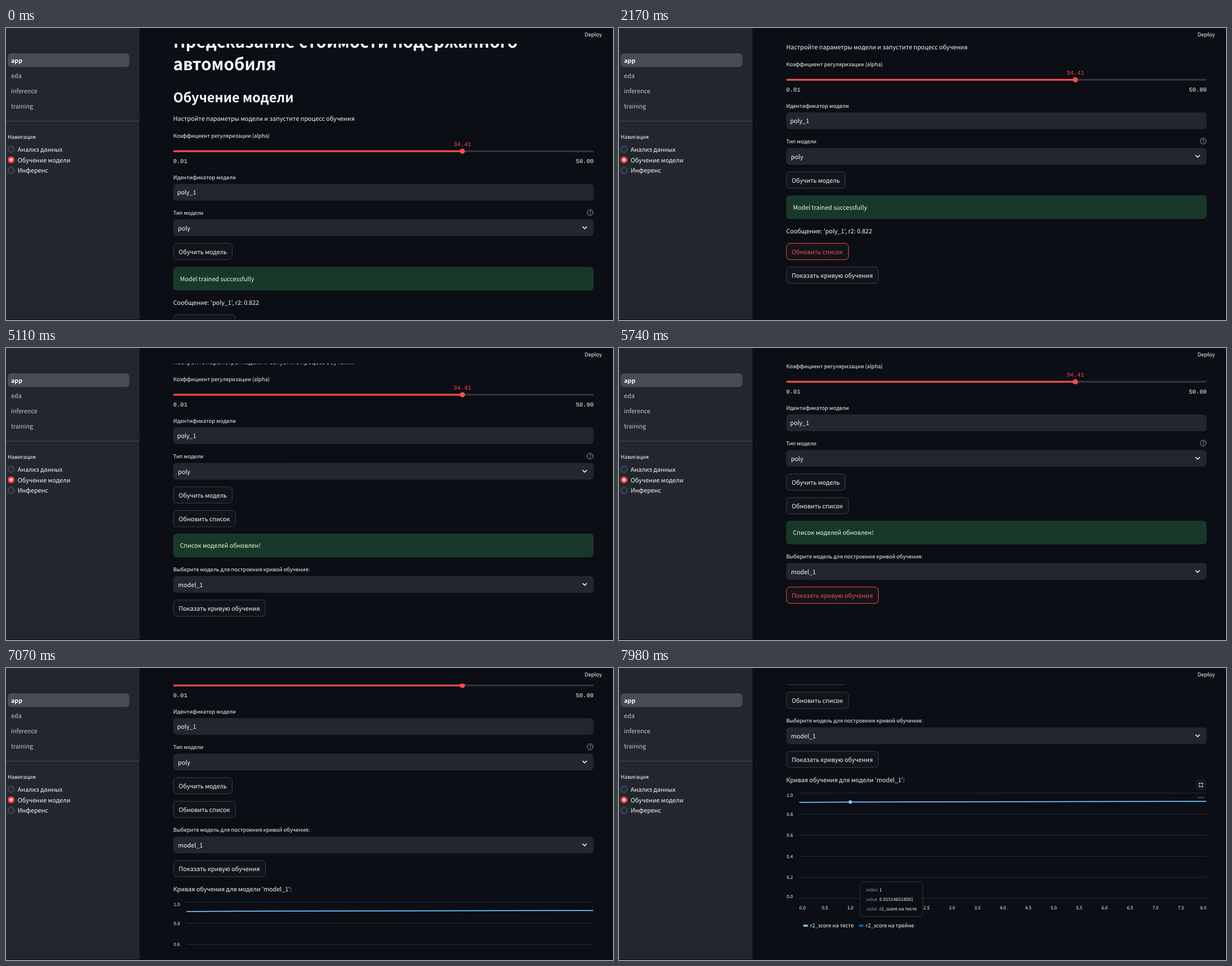
Recreate the animation shown at these times as an HTML page. Size 1080 by 519 pixels, loop 8000 ms.

```html
<!DOCTYPE html>
<html lang="ru">
<head>
<meta charset="utf-8">
<title>Обучение модели</title>
<style>
  html, body { margin: 0; width: 100%; height: 100%; overflow: hidden; background: #0b0e14; }
  svg { display: block; width: 100%; height: 100%; text-rendering: geometricPrecision; }
  text { font-family: var(--sans); font-size: calc(12px * var(--k)); fill: #fafafa; white-space: pre; }
  .label { font-size: calc(10.5px * var(--k)); }
  .tick { font-size: calc(9px * var(--k)); }
  .h1 { font-size: var(--h1); font-weight: 700; }
  .h2 { font-size: var(--h2); font-weight: 600; }
  .mono { font: 10.5px "Liberation Mono", monospace; }
  .bold { font-weight: 600; }
  .dim { fill: #c6c7cb; }
  .faint { fill: #94969c; }
  .red { fill: #ff4b4b; }
  .mid { text-anchor: middle; }
  .end { text-anchor: end; }
  .field { fill: #24262f; }
  .success { fill: #1a3829; }
  .success + text { fill: #dffde9; }
  .line { fill: none; stroke: #fafafa; stroke-linecap: round; stroke-linejoin: round; }
  .grid { stroke: #2b2e36; stroke-width: 1; }
  .button rect { fill: #11151b; stroke: #3d4047; }
  .warm rect { stroke: #9c454a; }
  .warm text { fill: #fda2a2; }
  .hot rect { stroke: #ff4b4b; }
  .hot text { fill: #ff4b4b; }
  .pressed rect { fill: #ff4b4b; stroke: #ff4b4b; }
</style>
</head>
<body>
<svg id="stage" viewBox="0 0 1080 519"></svg>
<script>
const LOOP = 8000;
const LEFT = 297.5, RIGHT = 1045.5;
const INTRO = 'Настройте параметры модели и запустите процесс обучения';
const TITLE = 'Предсказание стоимости подержанного';
const HEADING = 'Обучение модели';

// Pick a typeface with proportional Cyrillic and calibrate its optical size.
const pen = document.createElement('canvas').getContext('2d');
function widthPerPx(sample, family, weight = 400) {
  pen.font = `${weight} 100px ${family}`;
  return pen.measureText(sample).width / 100;
}
const fallback = '"Open Sans", sans-serif';
const preferred = `"Noto Sans CJK JP", "Noto Sans CJK SC", ${fallback}`;
const sans = widthPerPx('ллл', preferred) < 2.3 ? preferred : fallback;
const root = document.documentElement.style;
root.setProperty('--sans', sans);
root.setProperty('--k', 323 / 12 / widthPerPx(INTRO, sans));
root.setProperty('--h1', 613 / widthPerPx(TITLE, sans, 700) + 'px');
root.setProperty('--h2', 214.5 / widthPerPx(HEADING, sans, 600) + 'px');

const text = (x, y, str, cls = '') => `<text x="${x}" y="${y}" class="${cls}">${str}</text>`;
const rect = (x, y, w, h, r, attrs) =>
  `<rect x="${x}" y="${y}" width="${w}" height="${h}" rx="${r}" ${attrs}/>`;
const circle = (x, y, r, attrs) => `<circle cx="${x}" cy="${y}" r="${r}" ${attrs}/>`;
const path = (d, attrs) => `<path d="${d}" ${attrs}/>`;
const group = (id, body, cls = '') => `<g id="${id}" class="${cls}">${body}</g>`;

const field = y => rect(LEFT, y, RIGHT - LEFT, 29.7, 6, 'class="field"');
const select = (y, value) => field(y) + text(306, y + 19.4, value) +
  path(`M1026.2 ${y + 13.2}l3.4 3.4 3.4-3.4`, 'class="line" stroke-width="1.5"');
const button = (id, width, label) => group(id,
  rect(LEFT + .5, .5, width - 1, 29, 6, '') + text(307.3, 19.3, label), 'button');
const success = (id, message) => group(id,
  rect(LEFT, 0, RIGHT - LEFT, 42, 6, 'class="success"') + text(309.5, 25.3, message));

function sidebar() {
  const pages = ['app', 'eda', 'inference', 'training'];
  const modes = ['Анализ данных', HEADING, 'Инференс'];
  return rect(0, 0, 237.5, 519, 0, 'fill="#24262f"') +
    rect(3, 45, 216.5, 24.3, 6, 'fill="#484a54"') +
    pages.map((p, i) => text(9, 61.7 + 27.1 * i, p, i ? 'dim' : 'bold')).join('') +
    rect(0, 165, 237.5, 1, 0, 'fill="#4d4f57"') +
    text(3, 197.2, 'Навигация', 'label') +
    modes.map((m, i) => {
      const y = 215.5 + 18.8 * i;
      const dot = i === 1
        ? circle(9, y, 6, 'class="red"') + circle(9, y, 2.2, 'fill="#fff"')
        : circle(9, y, 5.5, 'fill="#282a33" stroke="#6b6d74"');
      return dot + text(20.7, y + 4.3, m);
    }).join('');
}

function form() {
  return text(LEFT, 35.3, TITLE, 'h1') + text(LEFT, 74.8, 'автомобиля', 'h1') +
    text(LEFT, 132.3, HEADING, 'h2') +
    text(LEFT, 164.8, INTRO) +
    text(LEFT, 194.8, 'Коэффициент регуляризации (alpha)', 'label') +
    text(812, 209.6, '34.41', 'mono red mid') +
    rect(LEFT, 217.5, RIGHT - LEFT, 3, 1.5, 'fill="#34373e"') +
    rect(LEFT, 217.5, 514.5, 3, 1.5, 'class="red"') +
    circle(812, 219, 4.6, 'class="red"') +
    text(LEFT, 239.6, '0.01', 'mono') + text(RIGHT, 239.6, '50.00', 'mono end') +
    text(LEFT, 268.8, 'Идентификатор модели', 'label') +
    field(277) + text(304.5, 296.3, 'poly_1') +
    text(LEFT, 331.8, 'Тип модели', 'label') +
    circle(1039.3, 328, 5.2, 'fill="none" stroke="#a3a5aa"') +
    text(1039.3, 331.2, '?', 'tick mid dim') +
    select(340.2, 'poly');
}

// Chart coordinates have the top grid line at y = 0.
function chart() {
  const x0 = 321, x1 = 1045, unit = (x1 - x0) / 8, height = 187.2;
  const px = v => x0 + v * unit, py = v => (1 - v) * height;
  let out = text(LEFT, -19, "Кривая обучения для модели 'model_1':");
  for (let i = 0; i <= 5; i++) {
    const y = height * i / 5;
    const nudge = i === 0 ? 3.5 : i === 5 ? -4 : 0;
    out += path(`M${x0} ${y}H${x1}`, 'class="grid"') +
      text(309.5, y + 3.2 + nudge, (1 - i / 5).toFixed(1), 'tick end');
  }
  for (let i = 0; i <= 16; i++) {
    const nudge = i === 0 ? 5.3 : i === 16 ? -5.3 : 0;
    out += text(px(i / 2) + nudge, 206.3, (i / 2).toFixed(1), 'tick mid');
  }
  const curve = [[0, .9125], [1, .91515], [3, .918], [8, .9215]];
  const plot = (shift, color) => path('M' + curve.map(([x, v]) => `${px(x)} ${py(v) + shift}`).join('L'),
    `fill="none" stroke="${color}" stroke-width="1.5"`);
  out += plot(.3, '#0068c9') + plot(0, '#83c9ff');
  [['#83c9ff', 'r2_score на тесте', 328], ['#0068c9', 'r2_score на трейне', 427]].forEach(([color, name, x]) => {
    out += rect(x, 234, 8, 3.4, .5, `fill="${color}"`) + text(x + 12, 239, name, 'label');
  });
  const dots = [1031.3, 1035.5, 1039.7].map(x => circle(x, 8, 1.4, 'fill="#5d6067"')).join('');
  const corners = 'M1032.7 -15.6v-1.8h1.8M1036.5 -17.4h1.8v1.8M1038.3 -13.2v1.8h-1.8M1034.5 -11.4h-1.8v-1.8';
  out += group('tools', rect(1026, -24.3, 19, 19, 5, 'fill="#171a21"') +
    path(corners, 'class="line" stroke-width="1.2"') + dots);
  const rows = [['index', '1'], ['value', '0.915146518591'], ['color', 'r2_score на тесте']];
  out += group('hover', circle(px(1), py(.91515), 3.1, 'fill="#83c9ff"') +
    group('tip', rect(429.2, .5, 111.3, 61.5, 6, 'fill="#0b0e14" stroke="#33363d"') +
      rows.map(([key, value], i) => text(460, 17.4 + 17.2 * i, key, 'tick faint end') +
        text(463.3, 17.4 + 17.2 * i, value, 'tick')).join('')));
  return out;
}

document.getElementById('stage').innerHTML =
  '<clipPath id="view"><rect x="238" y="28" width="842" height="491"/></clipPath>' +
  `<g clip-path="url(#view)">` + group('page',
    form() +
    button('train', 105.5, 'Обучить модель') +
    success('trained', 'Model trained successfully') +
    group('message', text(LEFT, 492.2, "Сообщение: 'poly_1', r2: 0.822")) +
    button('refresh', 111.3, 'Обновить список') +
    success('refreshed', 'Список моделей обновлен!') +
    group('pick', text(LEFT, -8.3, 'Выберите модель для построения кривой обучения:', 'label') + select(0, 'model_1')) +
    button('show', 164.5, 'Показать кривую обучения') +
    group('chart', chart())) + '</g>' +
  sidebar() +
  text(1029.5, 14.7, 'Deploy', 'label') +
  rect(0, 518, 1080, 1, 0, 'fill="#06080c"');

const el = id => document.getElementById(id);
const moveY = (id, y) => el(id).setAttribute('transform', `translate(0 ${y})`);
const visible = (id, on) => { el(id).style.display = on ? '' : 'none'; };
const setState = (id, state) => el(id).setAttribute('class', `button ${state}`);
const at = (track, t) => track.reduce((value, [time, next]) => t >= time ? next : value, track[0][1]);

const TICK = 70;
const run = (start, values) => values.map((v, i) => [start + i * TICK, v]);
const scroll = [
  [0, 0],
  ...run(770, [48, 107, 129.5, 131]),
  ...run(1120, [130, 129, 128, 127]),
  ...run(5110, [136, 150, 157.3]),
  ...run(5390, [157.6, 158, 158.3, 158.6, 158.8, 159]),
  ...run(7000, [166, 188, 240, 302, 346, 371, 382]),
];
const layout = [[0, 'trained'], [4340, 'refreshed'], [6370, 'chart']];
const refreshState = [[0, ''], [2100, 'warm'], [2170, 'hot'], [4200, 'pressed'], [4340, 'warm'], [4410, '']];
const showState = [[0, ''], [5670, 'warm'], [5740, 'hot'], [6230, 'pressed'], [6370, 'hot'], [6650, 'warm'], [6720, '']];
const toolsOpacity = [[0, 0], [7700, .5], [7770, 1]];
const tipY = [[0, 402], ...run(7700, [402, 397, 391, 385, 379.7])];

moveY('train', 382.3);
moveY('trained', 424.4);
moveY('refreshed', 466);

function draw(t) {
  const mode = at(layout, t);
  const first = mode === 'trained', second = mode === 'refreshed';
  const extra = second ? 53.8 : 0;
  moveY('page', -at(scroll, t));
  visible('trained', first);
  visible('message', first);
  visible('refreshed', second);
  visible('pick', !first);
  visible('chart', t >= 6440);
  moveY('refresh', first ? 509.3 : 424.3);
  moveY('pick', 487.5 + extra);
  moveY('show', first ? 551.5 : 529.6 + extra);
  moveY('chart', 604.3);
  setState('refresh', at(refreshState, t));
  setState('show', at(showState, t));
  el('tools').style.opacity = at(toolsOpacity, t);
  visible('hover', t >= 7700);
  moveY('tip', at(tipY, t) - 222.3);
}

const start = performance.now();
function frame() {
  draw((performance.now() - start) % LOOP);
  requestAnimationFrame(frame);
}
frame();
</script>
</body>
</html>
```
